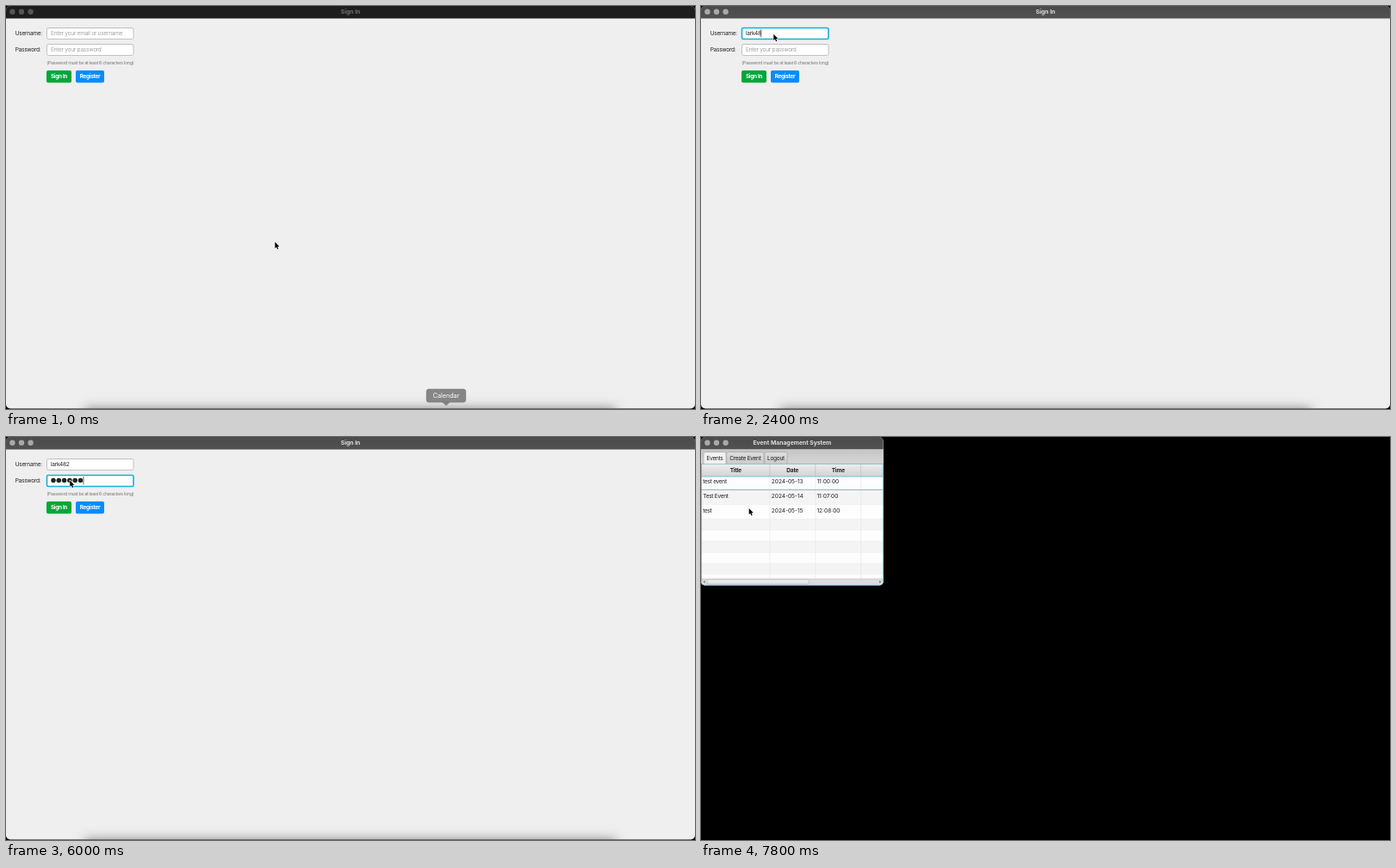
Animation of 800 by 469 pixels, one loop 8 s. Source, as an HTML page with a canvas:

```html
<!DOCTYPE html>
<html lang="en">
<head>
<meta charset="utf-8">
<title>Sign In</title>
<style>
html, body { margin: 0; width: 100%; height: 100%; overflow: hidden; background: #000; }
canvas { display: block; width: 800px; height: 469px; }
</style>
</head>
<body>
<canvas id="stage"></canvas>
<script>
const W = 800, H = 469, LOOP = 8000, STEP = 200;
const USER = 'lark482';
const canvas = document.getElementById('stage');
const ctx = canvas.getContext('2d');
const dpr = window.devicePixelRatio || 1;
canvas.width = W * dpr;
canvas.height = H * dpr;

function rect(x, y, w, h, fill) {
  ctx.fillStyle = fill;
  ctx.fillRect(x, y, w, h);
}

function box(x, y, w, h, radius, fill, stroke, line = 1) {
  ctx.beginPath();
  ctx.roundRect(x, y, w, h, radius);
  if (fill) { ctx.fillStyle = fill; ctx.fill(); }
  if (stroke) { ctx.strokeStyle = stroke; ctx.lineWidth = line; ctx.stroke(); }
}

function poly(points, fill, stroke, line) {
  ctx.beginPath();
  points.forEach(([x, y]) => ctx.lineTo(x, y));
  ctx.closePath();
  if (stroke) { ctx.strokeStyle = stroke; ctx.lineWidth = line; ctx.stroke(); }
  ctx.fillStyle = fill;
  ctx.fill();
}

function dot(x, y, r, fill) {
  ctx.beginPath();
  ctx.arc(x, y, r, 0, Math.PI * 2);
  ctx.fillStyle = fill;
  ctx.fill();
}

function vertical(y0, y1, from, to) {
  const g = ctx.createLinearGradient(0, y0, 0, y1);
  g.addColorStop(0, from);
  g.addColorStop(1, to);
  return g;
}

// Draws a line of text and returns its width.
function text(str, x, y, { size = 6.6, weight = 400, color = '#222', gap = -0.3, align = 'left' } = {}) {
  ctx.font = `${weight} ${size}px Inter, "Liberation Sans", sans-serif`;
  ctx.letterSpacing = gap + 'px';
  ctx.textAlign = align;
  ctx.fillStyle = color;
  ctx.fillText(str, x, y);
  return ctx.measureText(str).width;
}

function titleBar(w, title, active) {
  rect(0, 0, w, 14.5, active ? vertical(0, 14, '#4b4b4b', '#515151') : '#1d1d1d');
  for (let i = 0; i < 3; i++) dot(7.4 + i * 10.6, 6.8, 3.2, active ? '#a9a9a9' : '#555');
  text(title, w / 2, 9.1, { size: 6.8, weight: 700, gap: 0, align: 'center', color: active ? '#dedede' : '#707070' });
}

function field(y, focused) {
  if (focused) {
    box(47.5, y + 0.5, 100.5, 13, 1.5, '#fff', '#16b0da', 1.6);
  } else {
    box(47.5, y + 0.5, 100.5, 13, 1.8, vertical(y, y + 4, '#f3f3f3', '#fff'), '#bdbdbd', 0.9);
  }
}

function caret(x, y) {
  rect(x, y, 0.7, 9.2, '#222');
}

function button(x, w, label, fill) {
  box(x, 75, w, 14.3, 1.8, fill);
  text(label, x + w / 2, 84.4, { size: 6.5, weight: 700, gap: -0.35, color: '#fff', align: 'center' });
}

function pointer(x, y) {
  ctx.save();
  ctx.translate(x, y);
  ctx.lineJoin = 'round';
  poly([[0, 0], [0, 7.3], [1.6, 5.8], [2.8, 8.5], [4, 8], [2.9, 5.4], [5.1, 5.3]], '#000', '#fff', 1.1);
  ctx.restore();
}

function tooltip() {
  box(488.3, 446, 45.4, 15, 2.5, '#868686', '#747474', 0.8);
  poly([[506.5, 461], [515.5, 461], [511, 465.3]], '#808080');
  text('Calendar', 511, 456, { size: 7.3, gap: -0.05, color: '#fff', align: 'center' });
}

function dockShadow() {
  ctx.save();
  ctx.beginPath();
  ctx.rect(0, 440, W, 28.5);
  ctx.clip();
  ctx.shadowColor = 'rgba(0,0,0,0.42)';
  ctx.shadowBlur = 13 * dpr;
  ctx.shadowOffsetY = -40 * dpr;
  rect(92, 508, 616, 30, '#000');
  ctx.restore();
}

function signIn(t) {
  const active = t >= 800;
  const onUser = active && t < 3600;
  const onPass = t >= 3600 && t < 7400;
  const typed = t < 1400 ? 0
    : t < 2400 ? Math.min(4, 1 + Math.floor((t - 1400) / STEP))
    : t < 2600 ? 6 : 7;
  const bullets = Math.max(0, Math.min(6, Math.floor((t - 4400) / STEP)));

  ctx.save();
  ctx.beginPath();
  ctx.roundRect(0, 0, W, 468.5, 5);
  ctx.clip();
  rect(0, 0, W, H, '#efefef');
  dockShadow();
  titleBar(W, 'Sign In', active);
  ctx.restore();

  text('Username:', 10.7, 34);
  text('Password:', 10.7, 53);
  field(25, onUser);
  field(44, onPass);

  const hint = { color: '#a3a3a3' };
  let end = 52;
  if (typed) end += text(USER.slice(0, typed), 52, 34);
  else if (!onUser) text('Enter your email or username', 52, 34, hint);
  const userCaret = t < 1200 || (t >= 1400 && t < 3000) || t >= 3400;
  if (onUser && userCaret) caret(end - 0.3, 27.2);

  if (!onPass && !bullets) text('Enter your password', 52, 53, hint);
  for (let i = 0; i < bullets; i++) dot(55 + i * 6.3, 50.6, 2.75, '#222');
  const passCaret = t < 4000 || (t >= 4600 && t < 6800) || t >= 7000;
  if (onPass && passCaret) caret(51.8 + bullets * 6.3, 46.2);

  text('(Password must be at least 6 characters long)', 47.3, 68.3, { size: 5.3, gap: -0.31, color: '#777' });
  button(47, 29, 'Sign In', '#04a63a');
  button(81, 33, 'Register', '#058cff');
  if (t < 400) tooltip();
}

function tab(x, w, label, selected) {
  const fill = selected ? '#f1f1f1' : vertical(17, 31, '#dedede', '#cbcbcb');
  box(x, 17.5, w, 14, [2, 2, 0, 0], fill, '#a6a6a6', 0.7);
  text(label, x + w / 2, 26.5, { align: 'center' });
}

function eventTable() {
  const cols = [79.7, 132.6, 185.5];
  const events = [
    ['test event', '2024-05-13', '11:00:00'],
    ['Test Event', '2024-05-14', '11:07:00'],
    ['test', '2024-05-15', '12:08:00']
  ];

  ctx.save();
  ctx.beginPath();
  ctx.roundRect(0, 0, 211.7, 172.7, 5);
  ctx.clip();
  rect(0, 0, 212, 173, '#efefef');
  titleBar(211.7, 'Event Management System', true);

  rect(0, 14.5, 212, 17, vertical(15, 31, '#c6c6c6', '#d5d5d5'));
  rect(0, 30.8, 212, 0.7, '#a6a6a6');
  tab(3, 26, 'Events', true);
  tab(29.7, 43.3, 'Create Event');
  tab(73.8, 26.4, 'Logout');

  for (let i = 0, y = 44.3; y < 165; i++) {
    const h = i < 3 ? 17 : 12.9;
    rect(0, y, 212, h, i % 2 ? '#f4f4f4' : '#fdfdfd');
    if (i > 1) rect(0, y, 212, 0.5, '#ececec');
    y += h;
  }
  cols.forEach(x => rect(x, 45, 0.6, 120, '#e3e3e3'));

  rect(0, 31.5, 212, 14.3, vertical(31, 46, '#efefef', '#d2d2d2'));
  cols.forEach(x => rect(x, 31.5, 0.6, 14.3, '#b9b9b9'));
  rect(0, 45.6, 212, 0.8, '#46b4d4');
  rect(0, 61, 212, 0.8, '#86a3ac');

  const head = { weight: 700, align: 'center', gap: -0.2 };
  ['Title', 'Date', 'Time'].forEach((name, i) => text(name, [40.3, 106.3, 159.3][i], 40.8, head));
  events.forEach(([title, date, time], i) => {
    const y = 53.6 + i * 17;
    text(title, 2.2, y);
    text(date, 81.8, y, { gap: -0.05 });
    text(time, 134.4, y, { gap: 0 });
  });

  rect(0, 164.8, 212, 8, '#dcdcdc');
  rect(0, 164.8, 212, 0.6, '#c4c4c4');
  box(7, 166, 118.5, 5.4, 2, vertical(166, 171, '#f4f4f4', '#dedede'), '#b2b2b2', 0.6);
  poly([[2.5, 168.6], [4.6, 166.9], [4.6, 170.3]], '#777');
  poly([[209.3, 168.6], [207.2, 166.9], [207.2, 170.3]], '#777');

  rect(0, 31.2, 0.8, 141, '#35afd3');
  rect(210.9, 31.2, 0.8, 141, '#35afd3');
  rect(0, 31.2, 212, 0.6, '#6fb9d0');
  rect(0, 171.9, 212, 0.8, '#35afd3');
  ctx.restore();
}

const lerp = (a, b, k) => a + (b - a) * k;

function glide(t, start, end, from, to) {
  const p = Math.max(0, Math.min(1, (t - start) / (end - start)));
  const k = p * p * (3 - 2 * p);
  return [lerp(from[0], to[0], k), lerp(from[1], to[1], k)];
}

function pointerAt(t) {
  if (t < 800) return glide(t, 0, 700, [312.3, 274.6], [84.7, 27.4]);
  if (t < 5600) return glide(t, 900, 1200, [84.7, 27.4], [84.3, 32.7]);
  return glide(t, 5600, 6600, [84.3, 32.7], [55.7, 83]);
}

function draw(t) {
  ctx.setTransform(dpr, 0, 0, dpr, 0, 0);
  rect(0, 0, W, H, '#000');
  if (t < 7600) signIn(t);
  else eventTable();
  pointer(...pointerAt(t));
}

function tick() {
  const t = performance.now() % LOOP;
  draw(Math.floor(t / STEP) * STEP);
  requestAnimationFrame(tick);
}
tick();
</script>
</body>
</html>
```
